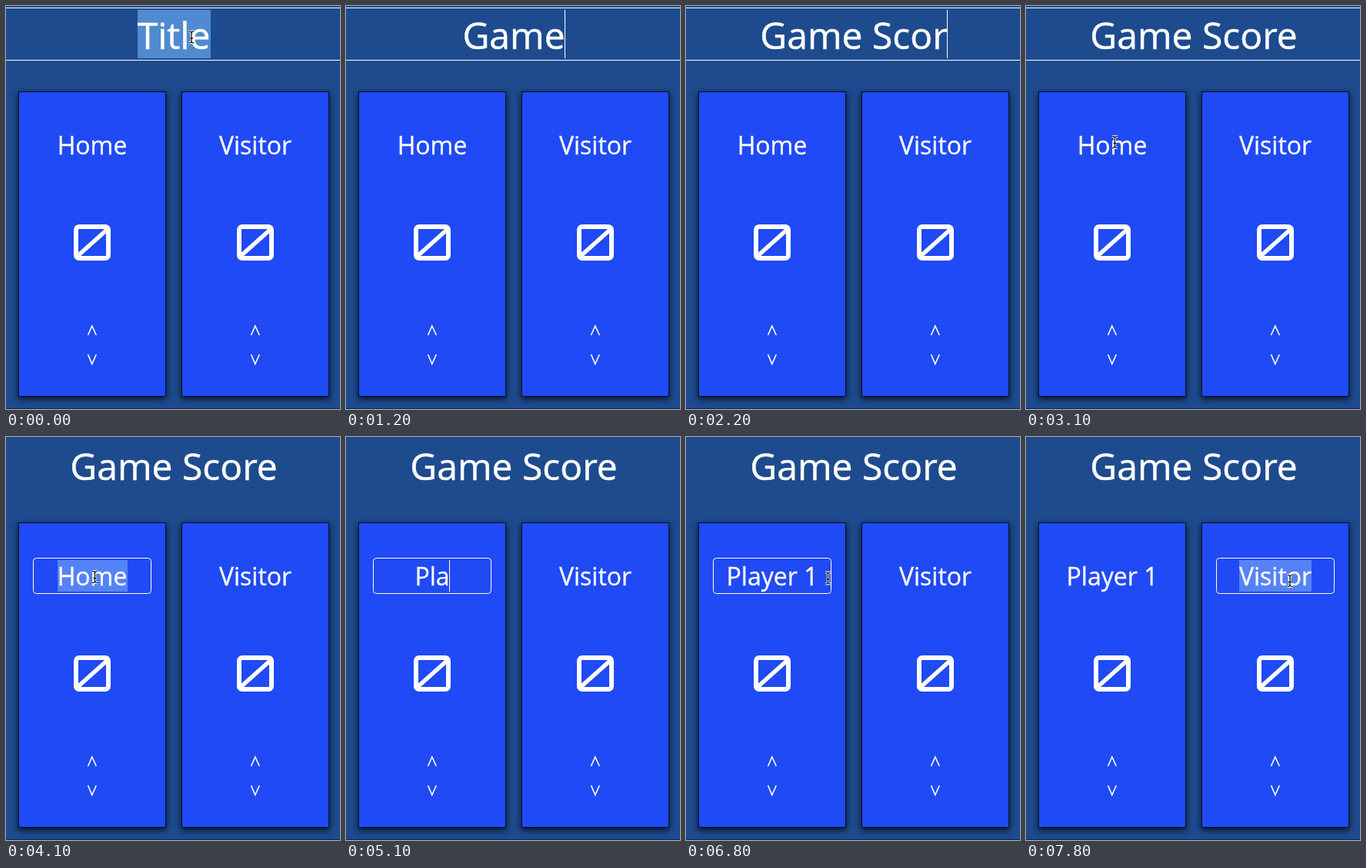
Animation of 434 by 524 pixels, one loop 8000 ms. Source, as an HTML page with a canvas:

```html
<!DOCTYPE html>
<html>
<head>
<meta charset="utf-8">
<style>
html, body { margin: 0; width: 100%; height: 100%; overflow: hidden; background: #1d4b8e; }
canvas { display: block; }
</style>
</head>
<body>
<canvas id="stage" width="434" height="524"></canvas>
<script>
const ctx = document.getElementById('stage').getContext('2d');
const LOOP = 8000, BLUE = '#1f4af5';

const title = { x: 218, base: 56, size: 48, top: 5, height: 63, mark: '#508ad0' };
const home = { x: 112, base: 193, size: 32, top: 160, height: 41, mark: '#5583f7' };
const visitor = { ...home, x: 324 };

const titleKeys = [500, 700, 900, 1100, 1300, 1500, 1700, 1900, 2100, 2300];
const homeKeys = [4500, 4800, 5000, 5200, 5500, 5700, 6100, 6300];

function typed(before, after, keys, t) {
  const count = keys.filter(k => k <= t).length;
  return count ? after.slice(0, count) : before;
}

// The caret stays solid after a key and then blinks.
function caretOn(keys, t) {
  const last = keys.filter(k => k <= t).pop();
  return last !== undefined && (t - last) % 1000 < 500;
}

function field(f, text, selected, caretAt) {
  ctx.font = `${f.size}px "Open Sans", sans-serif`;
  const width = ctx.measureText(text).width, left = f.x - width / 2;
  if (selected) {
    ctx.fillStyle = f.mark;
    ctx.fillRect(Math.round(left), f.top, Math.round(width), f.height);
  }
  ctx.fillStyle = ctx.strokeStyle = '#fff';
  ctx.lineWidth = f.size / 90;
  ctx.fillText(text, left, f.base);
  ctx.strokeText(text, left, f.base);
  if (caretAt >= 0) {
    const x = left + ctx.measureText(text.slice(0, caretAt)).width;
    ctx.fillRect(Math.floor(x), f.top, 1, f.height);
  }
}

function line(color, width, ...points) {
  ctx.strokeStyle = color;
  ctx.lineWidth = width;
  ctx.beginPath();
  points.forEach(([x, y]) => ctx.lineTo(x, y));
  ctx.stroke();
}

function roundBox(x, y, w, h, r, width) {
  ctx.strokeStyle = '#fff';
  ctx.lineWidth = width;
  ctx.beginPath();
  ctx.roundRect(x, y, w, h, r);
  ctx.stroke();
}

function card(x) {
  ctx.save();
  ctx.shadowColor = 'rgba(0,0,0,.8)';
  ctx.shadowBlur = 8;
  ctx.shadowOffsetY = 3;
  ctx.fillStyle = '#06102c';
  ctx.fillRect(x - 96, 111, 192, 397);
  ctx.restore();
  ctx.fillStyle = BLUE;
  ctx.fillRect(x - 95, 112, 190, 395);
  roundBox(x - 21, 287, 42, 41, 4, 6);
  line('#fff', 5.5, [x - 19, 325], [x + 19, 291]);
  line('#fff', 1.6, [x - 5.5, 428], [x - .2, 416], [x + 5.3, 428]);
  line('#fff', 1.6, [x - 5.5, 453], [x - .2, 465.5], [x + 5.3, 453]);
}

const focusRing = f => roundBox(f.x - 76.5, 157.5, 153, 46, 4, 1);

function pointer(x, y) {
  for (const [color, width] of [['#fff', 3], ['#000', 1.2]]) {
    line(color, width, [x, y - 7], [x, y + 7]);
    line(color, width, [x - 3.5, y - 7.5], [x - 1.5, y - 7.5], [x, y - 6], [x + 1.5, y - 7.5], [x + 3.5, y - 7.5]);
    line(color, width, [x - 3.5, y + 7.5], [x - 1.5, y + 7.5], [x, y + 6], [x + 1.5, y + 7.5], [x + 3.5, y + 7.5]);
    line(color, width, [x - 2, y + 1.5], [x + 2, y + 1.5]);
  }
}

function glide(t, start, end, from, to) {
  const p = Math.min(1, Math.max(0, (t - start) / (end - start)));
  const e = p * p * (3 - 2 * p);
  return from.map((v, i) => v + (to[i] - v) * e);
}

function mouse(t) {
  if (t < 500) return [241, 40.5];
  if (t >= 2600 && t < 3200) return glide(t, 2600, 3050, [241, 40.5], [115.5, 177]);
  if (t >= 3200 && t < 4500) return glide(t, 3200, 3300, [115.5, 177], [115.5, 182]);
  if (t >= 6600) return glide(t, 6600, 7150, [115.5, 182], [343, 187]);
}

function draw(t) {
  ctx.fillStyle = '#1d4b8e';
  ctx.fillRect(0, 0, 434, 524);
  ctx.fillStyle = '#0f2a55';
  ctx.fillRect(0, 523, 434, 1);
  card(home.x);
  card(visitor.x);

  const onTitle = t < 3300, onHome = t >= 3300 && t < 7200, onVisitor = t >= 7200;
  if (onTitle) {
    ctx.fillStyle = '#fff';
    ctx.fillRect(0, 2, 434, 1);
    ctx.fillRect(0, 70, 434, 1);
  }
  if (onHome) focusRing(home);
  if (onVisitor) focusRing(visitor);

  const heading = typed('Title', 'Game Score', titleKeys, t);
  field(title, heading, t < 500, onTitle && caretOn(titleKeys, t) ? heading.length : -1);

  const name = typed('Home', 'Player 1', homeKeys, t);
  let caret = -1;
  if (onHome && caretOn(homeKeys, t)) caret = name.length;
  if (t >= 3300 && t < 3800) caret = 2;
  field(home, name, t >= 4000 && t < 4500, caret);

  field(visitor, 'Visitor', t >= 7500, onVisitor && t < 7500 ? 5 : -1);

  const at = mouse(t);
  if (at) pointer(...at);
}

const begin = performance.now();
function tick() {
  draw((performance.now() - begin) % LOOP);
  requestAnimationFrame(tick);
}
tick();
</script>
</body>
</html>
```
